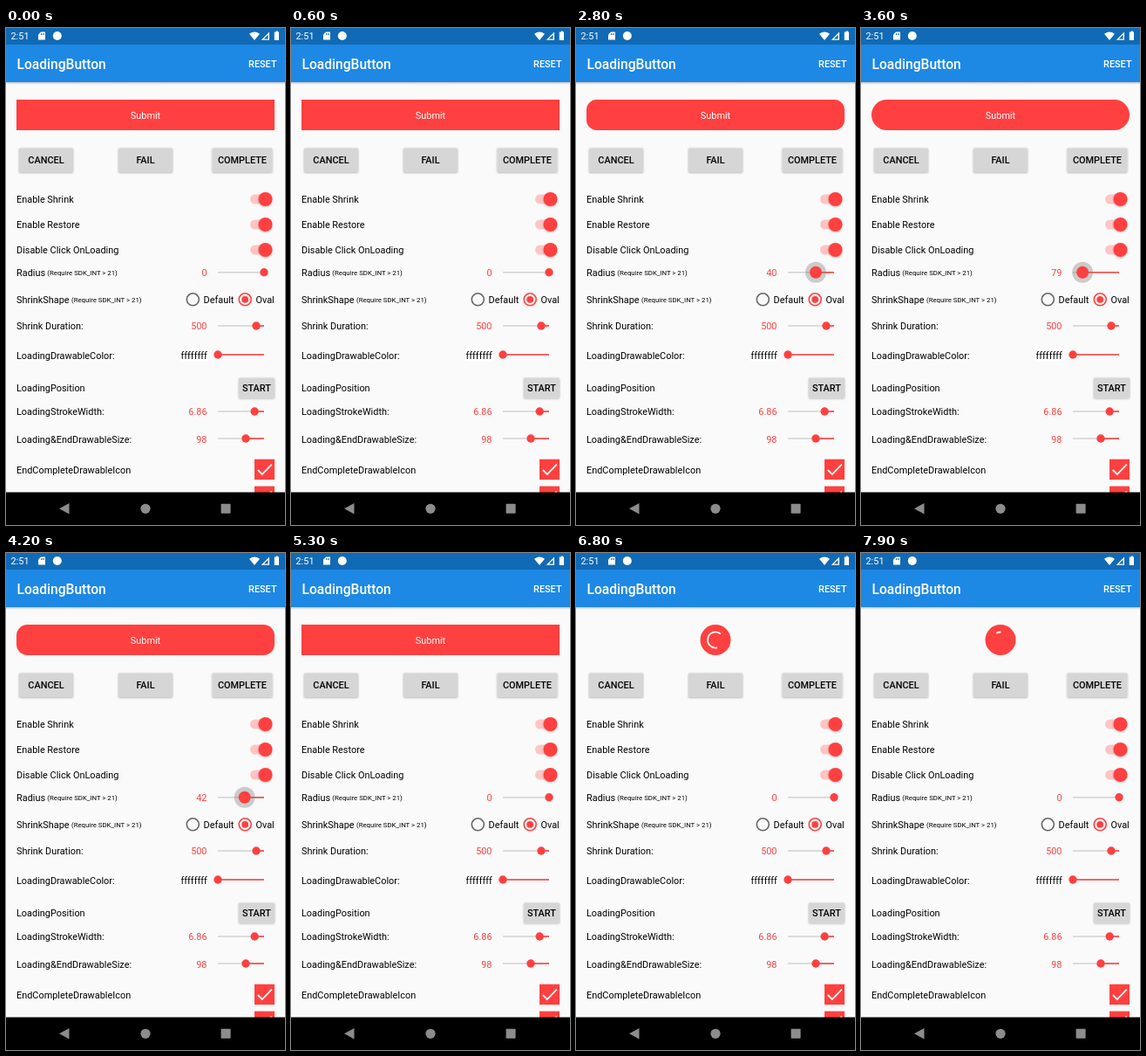
An HTML page that plays this animation: 320x569 px, repeating every 8000 ms.

```html
<!DOCTYPE html>
<html lang="en">
<head>
<meta charset="utf-8">
<title>Loading button settings</title>
<style>
  html, body { margin: 0; width: 100%; height: 100%; overflow: hidden; background: #fafafa; }
  svg { display: block; width: 100vw; height: 100vh; }
  text { font: 10.9px Roboto, Arial, sans-serif; fill: #000; }
  .medium { font-weight: 500; }
  .small { font-size: 7.8px; }
  .title { font-size: 15.6px; font-weight: 500; }
  .white { fill: #fff; }
  .red { fill: #ff4040; }
  .mid { text-anchor: middle; }
  .end { text-anchor: end; }
</style>
</head>
<body>
<svg id="stage" viewBox="0 0 320 569" xmlns="http://www.w3.org/2000/svg">
  <defs>
    <linearGradient id="barShadow" x2="0" y2="1">
      <stop stop-color="#000" stop-opacity=".2"/>
      <stop offset="1" stop-color="#000" stop-opacity="0"/>
    </linearGradient>
    <filter id="drop" x="-10%" y="-20%" width="120%" height="150%">
      <feDropShadow dx="0" dy=".8" stdDeviation=".8" flood-opacity=".3"/>
    </filter>
  </defs>
  <rect width="320" height="569" fill="#fafafa"/>
  <rect y="62" width="320" height="3" fill="url(#barShadow)"/>
  <rect width="320" height="62" fill="#1e88e5"/>
  <rect width="320" height="19" fill="#116ab5"/>

  <text class="white" x="5.5" y="13">2:51</text>
  <path class="white" d="M40 4.5h5v9h-8v-6z"/>
  <path d="M40.5 6v2M42 6v2M43.5 6v2" stroke="#116ab5" stroke-width=".8"/>
  <circle class="white" cx="58.8" cy="9" r="5"/>
  <path class="white" d="M279 6.8q6-4.4 12 0l-6 7.2zM302 4.5v9.3h-9.3zM308.8 4.6h1v-1h2v1h1.2v9.4h-5.2v-9.4z"/>
  <path d="M296.8 11.6l3.8-3.8v4.8h-4.8z" fill="#116ab5"/>
  <text class="white title" x="12.5" y="46.6">LoadingButton</text>
  <text class="white medium end" x="310.5" y="45">RESET</text>

  <rect id="submit" class="red" y="82"/>
  <text id="submitText" class="white mid" x="160" y="103.8">Submit</text>
  <path id="spinner" fill="none" stroke="#fff" stroke-width="1.8"/>

  <g id="form"></g>

  <rect y="531.5" width="320" height="38"/>
  <g fill="#8c8c8c">
    <path d="M61 550.3l11.5-6.3v12.6z"/>
    <circle cx="160" cy="550.3" r="5.6"/>
    <rect x="246.6" y="544.8" width="11" height="11" rx=".8"/>
  </g>
</svg>
<script>
const LOOP = 8000, RED = '#ff4040';
const $ = id => document.getElementById(id);
const form = $('form');

function add(tag, attrs, content = '') {
  const node = document.createElementNS('http://www.w3.org/2000/svg', tag);
  set(node, attrs);
  node.textContent = content;
  return form.appendChild(node);
}
function set(node, attrs) {
  for (const key in attrs) node.setAttribute(key, attrs[key]);
}
const label = (x, y, content, cls = '') => add('text', { x, y, class: cls }, content);

function button(x, y, width, height, content) {
  add('rect', { x, y, width, height, rx: 1, fill: '#d6d6d6', filter: 'url(#drop)' });
  label(x + width / 2, y + height / 2 + 4, content, 'medium mid');
}
function toggle(y) {
  add('rect', { x: 280, y: y - 5.5, width: 23, height: 11, rx: 5.5, fill: '#ffc4c4' });
  add('circle', { cx: 297.5, cy: y, r: 8, fill: RED, filter: 'url(#drop)' });
}
function slider(y, x) {
  add('path', { d: `M243 ${y}H296`, stroke: '#d2d2d2', 'stroke-width': 1.5 });
  const line = add('path', { stroke: RED, 'stroke-width': 1.6 });
  const halo = add('circle', { cy: y, r: 12, fill: '#777', opacity: 0 });
  const thumb = add('circle', { cy: y, fill: RED });
  const move = (px, press = 0) => {
    set(line, { d: `M${px} ${y}H296` });
    set(halo, { cx: px, opacity: 0.36 * press });
    set(thumb, { cx: px, r: 4.7 + 2.3 * press });
  };
  move(x);
  return move;
}
function radio(x, selected) {
  const color = selected ? RED : '#666';
  add('circle', { cx: x, cy: 310.8, r: 7, fill: 'none', stroke: color, 'stroke-width': 1.6 });
  if (selected) add('circle', { cx: x, cy: 310.8, r: 3.9, fill: color });
}
function checkbox(y) {
  add('rect', { x: 285, y, width: 23, height: 23.4, fill: RED });
  add('path', { d: `M288.8 ${y + 12.3}l5 5 11-11.3`, fill: 'none', stroke: '#fff', 'stroke-width': 1.8 });
}

button(15, 137.5, 62, 27.5, 'CANCEL');
button(129, 137.5, 62, 27.5, 'FAIL');
button(236.5, 137.5, 69, 27.5, 'COMPLETE');
['Enable Shrink', 'Enable Restore', 'Disable Click OnLoading'].forEach((name, i) => {
  label(12, 200 + 29 * i, name);
  toggle(196 + 29 * i);
});

label(12, 284, 'Radius');
label(47.3, 283, '(Require SDK_INT > 21)', 'small');
const radiusText = label(230.5, 284, '0', 'red end');
const moveRadius = slider(279.8, 296);

label(12, 315, 'ShrinkShape');
label(75, 314.3, '(Require SDK_INT > 21)', 'small');
radio(214.3, false);
label(226.5, 314.7, 'Default');
radio(274.2, true);
label(286.5, 314.7, 'Oval');

label(12, 345, 'Shrink Duration:');
label(230.5, 345, '500', 'red end');
slider(341, 287);

label(12, 378.5, 'LoadingDrawableColor:');
add('rect', { x: 200, y: 367.5, width: 31, height: 14, fill: '#fff' });
label(230.8, 378.5, 'ffffffff', 'end');
slider(374, 243);

label(12, 416, 'LoadingPosition');
button(267, 400.5, 41, 23, 'START');
label(12, 443.3, 'LoadingStrokeWidth:');
label(230.5, 443.3, '6.86', 'red end');
slider(439, 285.2);
label(12, 474.5, 'Loading&EndDrawableSize:');
label(230.5, 474.5, '98', 'red end');
slider(470, 275);
label(12, 510, 'EndCompleteDrawableIcon');
checkbox(493.7);
checkbox(524.6);

const clamp = v => Math.min(1, Math.max(0, v));
const ramp = (t, from, to) => clamp((t - from) / (to - from));
const ease = p => 0.5 - 0.5 * Math.cos(Math.PI * p);

// Eases along [time, value] stops.
function track(t, stops) {
  let value = stops[0][1];
  for (let i = 1; i < stops.length; i++) {
    const [t0, v0] = stops[i - 1], [t1, v1] = stops[i];
    value += (v1 - v0) * ease(ramp(t, t0, t1));
  }
  return value;
}

// Cubic bezier (.4, 0, .2, 1), solved by bisection.
function fastOutSlowIn(x) {
  let lo = 0, hi = 1;
  for (let i = 0; i < 20; i++) {
    const s = (lo + hi) / 2, r = 1 - s;
    if (1.2 * s * r * r + 0.6 * s * s * r + s ** 3 < x) lo = s; else hi = s;
  }
  return 3 * lo * lo * (1 - lo) + lo ** 3;
}

function spinnerPath(elapsed) {
  const turns = elapsed / 1332, count = Math.floor(turns), p = turns - count;
  const base = 0.78 * count;
  const head = base + 0.01 + 0.79 * fastOutSlowIn(clamp(2 * p));
  const tail = base + 0.79 * fastOutSlowIn(clamp(2 * p - 1));
  const spin = (0.21 + 0.6) * turns;
  const point = a => {
    const angle = 2 * Math.PI * (a + spin);
    return `${160 + 9 * Math.cos(angle)} ${99.5 + 9 * Math.sin(angle)}`;
  };
  return `M${point(tail)}A9 9 0 ${head - tail > 0.5 ? 1 : 0} 1 ${point(head)}`;
}

function draw(t) {
  const radius = track(t, [[2350, 0], [3250, 79], [3650, 79], [4800, 0]]);
  const press = ramp(t, 2250, 2400) * (1 - ramp(t, 5050, 5250));
  radiusText.textContent = Math.round(radius);
  moveRadius(296 - 0.53 * radius, press);

  const shrink = ramp(t, 6015, 6515);
  const width = 296 - 261 * ease(shrink);
  const corner = Math.max(Math.min(17.5, radius / 3.375), 17.5 * ramp(shrink, 0.75, 1));
  set($('submit'), { x: 160 - width / 2, width, height: 35, rx: corner });
  set($('submitText'), { opacity: shrink > 0 ? 0 : 1 });
  set($('spinner'), { d: shrink < 1 ? '' : spinnerPath(t - 6448) });
}

const start = performance.now();
function frame() {
  draw((performance.now() - start) % LOOP);
  requestAnimationFrame(frame);
}
frame();
</script>
</body>
</html>
```
